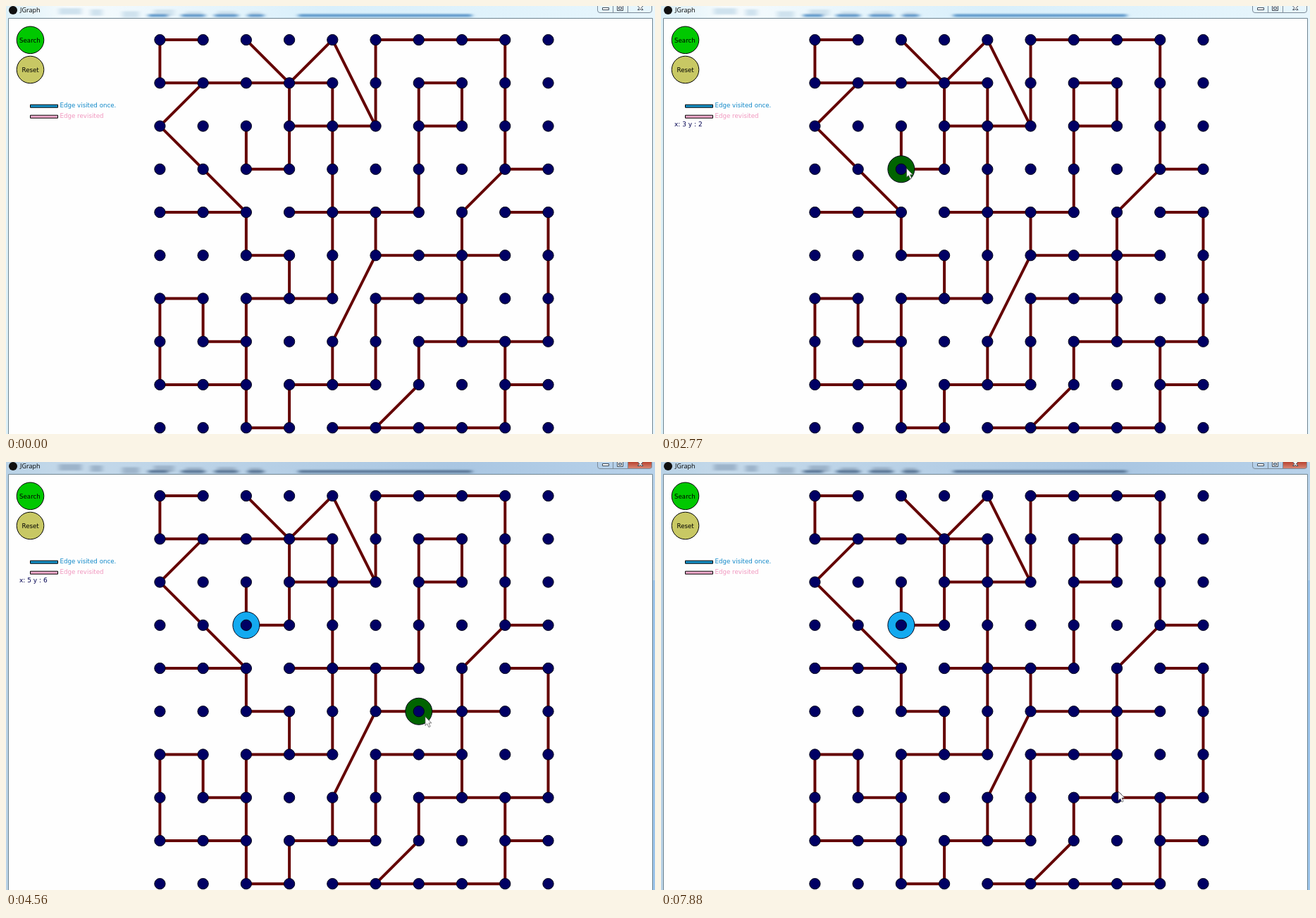
An HTML page that plays this animation: 921x608 px, repeating every 8000 ms.

```html
<!DOCTYPE html>
<html lang="en">
<head>
<meta charset="utf-8">
<title>JGraph</title>
<style>
  html, body { margin: 0; width: 100%; height: 100%; overflow: hidden; background: #fefefe; }
  svg { display: block; width: 921px; height: 608px; }
  text { font: 8.7px "DejaVu Sans", sans-serif; }
  .title { font: 9px "Open Sans", sans-serif; }
</style>
</head>
<body>
<svg viewBox="0 0 921 608">
  <defs>
    <filter id="blur" x="-10%" y="-100%" width="120%" height="300%"><feGaussianBlur stdDeviation="3 1"/></filter>
    <linearGradient id="pale">
      <stop offset="0" stop-color="#dcf0f8"/><stop offset=".1" stop-color="#f6fbfd"/>
      <stop offset=".5" stop-color="#d8effb"/><stop offset="1" stop-color="#e8f6fc"/>
    </linearGradient>
    <linearGradient id="glass">
      <stop offset="0" stop-color="#b9d2e6"/><stop offset=".1" stop-color="#c4d9ea"/>
      <stop offset=".7" stop-color="#a9c6e2"/><stop offset="1" stop-color="#b8d2ea"/>
    </linearGradient>
    <linearGradient id="red" x2="0" y2="1">
      <stop offset="0" stop-color="#b8432f"/><stop offset="1" stop-color="#d98a78"/>
    </linearGradient>
  </defs>

  <g id="inactive">
    <path d="M0 0H921V608H0Z" fill="url(#pale)"/>
    <g id="paleBlobs" filter="url(#blur)"></g>
  </g>
  <g id="active">
    <path d="M0 0H921V608H0Z" fill="url(#glass)"/>
    <path d="M918 168H921V608H918Z" fill="#9cc4ea"/>
    <g id="glassBlobs" filter="url(#blur)"></g>
    <path d="M883 0H917V6Q917 9.500 913 9.500H883Z" fill="url(#red)"/>
  </g>
  <path d="M3.500 608V17.500H917.500V608" fill="#fefefe" stroke="#6f8591"/>
  <circle cx="10" cy="6" r="6" fill="#101010"/>
  <text class="title" x="20" y="9">JGraph</text>
  <g fill="none" stroke="#7c8b99">
    <path d="M839.500 0V6Q839.500 9.500 843 9.500H913Q916.500 9.500 916.500 6V0M861.500 0V9M882.500 0V9"/>
    <g stroke="#3f4a56" fill="#fff">
      <path d="M846.500 2.500h9v3h-9ZM867.500 -1v7.500h8V-1M869.500 1.500h4v3h-4Z"/>
      <path d="M896.500 0l2.500 2.500l-2.500 3h2.500l1 -1.300l1.500 1.300h2.500l-2.500 -3L904 0"/>
    </g>
  </g>

  <g stroke="#000">
    <circle cx="34.500" cy="48.300" r="19.300" fill="#00c800"/>
    <circle cx="34.500" cy="90.500" r="19.300" fill="#c8c864"/>
    <path d="M34.500 140.200h39v4h-39Z" fill="#1490c8"/>
    <path d="M34.500 155.200h39v4h-39Z" fill="#f5aacd"/>
  </g>
  <text x="19" y="52">Search</text>
  <text x="22.500" y="94">Reset</text>
  <text x="76.500" y="144" fill="#1088c8">Edge visited once.</text>
  <text x="76.500" y="159" fill="#f096be">Edge revisited</text>
  <text id="label" x="19" y="171" fill="#000050" style="font-size:9px"></text>

  <!-- one unit is one grid cell -->
  <g transform="translate(218.400 48.100) scale(61.230)" stroke="#000014" stroke-width=".016">
    <path fill="none" stroke="#640000" stroke-width=".065" stroke-linecap="round" d="
      M1 0H0V1H4V6H2V9H3V8H5V6H7 M2 0L3 1L4 0L5 2V0H8V3L7 4V7 M8 3H9
      M1 1L0 2L2 4V5H3V6 M0 4H2 M3 1V3H2V2 M3 2H5 M6 2H7V1H6V4H3
      M5 4V5L4 7V8 M5 5H8 M8 4H9V7H6V8L5 9 M4 9H8V7 M8 8H9 M2 7H1V6H0V8H2"/>
    <circle id="start" cx="2" cy="3" r=".31" fill="#14aaf0"/>
    <circle id="hover" r=".31" fill="#006400"/>
    <g id="nodes" fill="#000064"></g>
  </g>
  <path id="cursor" d="M.5 .5V13.300L3.300 10.700L5.500 15.500L7.700 14.500L5.600 9.700H9.400Z" fill="#fff" stroke="#444" stroke-width=".7"/>
</svg>
<script>
const $ = id => document.getElementById(id);
const repeat = (n, f) => Array.from({ length: n }, (_, i) => f(i)).join('');

$('nodes').innerHTML = repeat(100, i => `<circle cx="${i % 10}" cy="${i / 10 | 0}" r=".125"/>`);

// soft shapes seen through the title bar
function blobs(id, haze, streak) {
  let seed = 7;
  const random = () => (seed = seed * 16807 % 2147483647) / 2147483647;
  const bar = (x, y, w, h, color) => `<rect x="${x}" y="${y}" width="${w}" height="${h}" fill="${color}"/>`;
  $(id).innerHTML =
    repeat(7, i => bar(75 + 45 * i, 3 + 6 * random(), 12 + 22 * random(), 9, haze)) +
    repeat(4, i => bar(202 + 47 * i, 11.5, 22 + 16 * random(), 4, streak)) +
    bar(415, 11.5, 246, 4, streak);
}
blobs('paleBlobs', '#cfe2ee', '#5b96c9');
blobs('glassBlobs', '#9db4ca', '#587696');

// cursor moves: first step, last step, end point
const STEP = 168;
const moves = [
  [410, 1320, 377, 258],
  [1480, 1480, 363, 226],
  [1630, 1630, 355, 215],
  [1950, 2450, 348, 230],
  [3780, 4240, 591, 362],
  [4560, 5550, 615, 356],
  [6050, 7010, 642, 454],
  [7160, 7880, 648.5, 467.5]
];

function cursorAt(t) {
  let x = 593, y = 614;
  for (const [from, to, endX, endY] of moves) {
    if (t < from) break;
    const gaps = Math.round((to - from) / STEP);
    const done = gaps ? Math.floor((t - from) / (to - from) * gaps + 1e-6) : 0;
    const p = Math.min(1, (done + 1) / (gaps + 1));
    x += (endX - x) * p;
    y += (endY - y) * p;
  }
  return [x, y];
}

const show = (id, on) => $(id).setAttribute('visibility', on ? 'visible' : 'hidden');

function draw(now) {
  const t = now % 8000;
  const first = t >= 2117 && t < 3780;
  const second = t >= 4560 && t < 5055;
  const [col, row] = first ? [2, 3] : [6, 5];
  show('active', t >= 2940);
  show('inactive', t < 2940);
  show('start', t >= 3110);
  show('hover', first || second);
  $('hover').setAttribute('cx', col);
  $('hover').setAttribute('cy', row);
  $('label').textContent = first || second ? `x: ${row} y : ${col}` : '';
  show('cursor', t >= 410);
  $('cursor').setAttribute('transform', `translate(${cursorAt(t)})`);
  requestAnimationFrame(draw);
}
requestAnimationFrame(draw);
</script>
</body>
</html>
```
